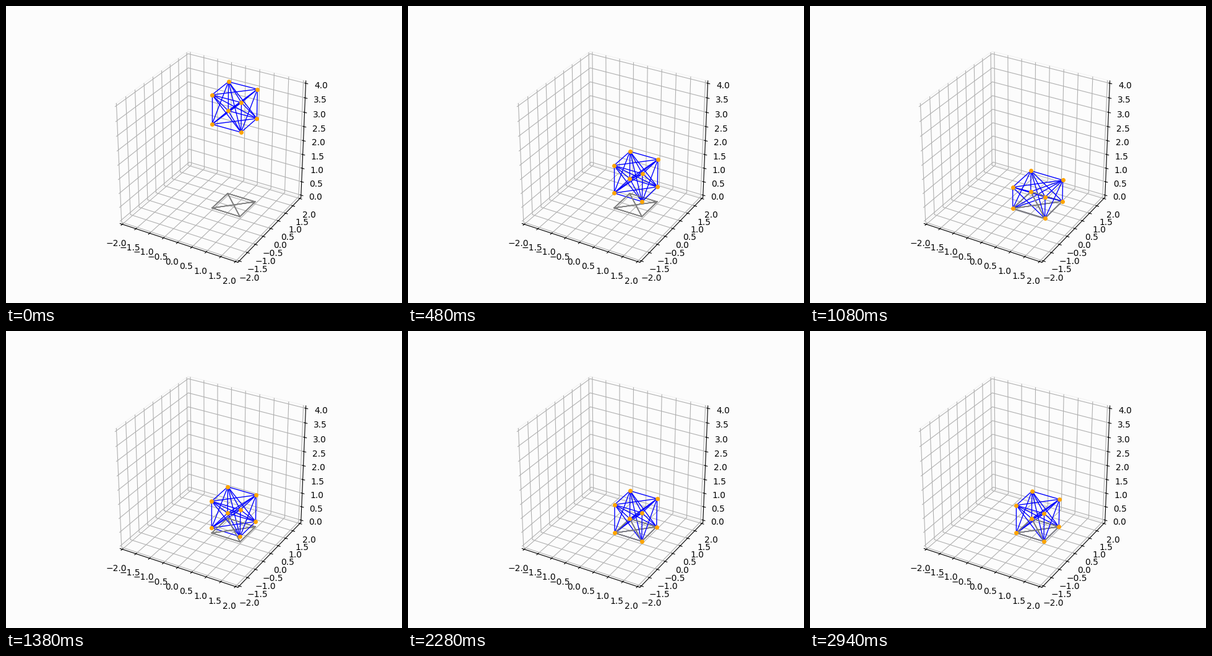
Recreate the animation shown at these times as a matplotlib script. Size 640 px wide and 480 px high, loop 3000 ms.

```python
from itertools import combinations, cycle, product
from math import cos, exp, pi, sin, tanh

import matplotlib.pyplot as plt
import numpy as np
from matplotlib.animation import FuncAnimation

FRAMES, INTERVAL = 50, 60
PAPER = "#fcfcfc"

# Physics in seconds and cube edges
DT, STEPS = 0.001, 100
GRAVITY, DRAG = 9.81, 0.999
CONTACT = 0.17           # time spent squashed on the floor
RETURN = (0.617, 0.92)   # speed kept; every second bounce regains spring energy
REST_SPEED = 0.45

CORNERS = np.array(list(product((0, 1), repeat=3)), float)
SPRINGS = list(combinations(range(8), 2))


def ringing(t):
    return -0.27 * exp(-0.4 * t) * cos(5.95 * (t - 3.13))


def squash(speed, since):
    return -0.25 * tanh(speed / 2) * sin(pi * since / CONTACT)


def simulate():
    """Return (base height, stretch) of the cube for every frame."""
    lift, v, keep = 3.0, 0.0, cycle(RETURN)
    landed, bounced, resting = None, False, False
    poses = []
    for step in range(FRAMES * STEPS):
        t = step * DT
        if landed is not None and t - landed >= CONTACT:
            v, landed, bounced = -v * next(keep), None, True
            resting = v < REST_SPEED
        if step % STEPS == 0:
            if landed is not None:
                poses.append((0, squash(-v, t - landed)))
            else:
                q = ringing(t) if bounced else 0
                poses.append((max(0, lift - q / 2), q))
        if landed is None and not resting:
            v = (v - GRAVITY * DT) * DRAG
            lift += v * DT
            if lift < 0:
                lift, landed = 0, t + DT
    return poses


def cube(base, stretch):
    width, height = 1 - 0.7 * stretch, 1 + stretch
    pts = (CORNERS - 0.5) * (width, width, height)
    return pts + (0.5, 0.5, base + height / 2)


POSES = simulate()

fig = plt.figure(figsize=(6.4, 4.8), dpi=100, facecolor=PAPER)
ax = fig.add_subplot(projection="3d", facecolor=PAPER)
ax.set_box_aspect((1, 1, 1))

links = []
for _ in SPRINGS:
    spring, = ax.plot([], [], [], color="blue", lw=1)
    shadow, = ax.plot([], [], [], color="gray", lw=1)
    links.append((spring, shadow))
masses, = ax.plot([], [], [], "o", color="orange", ms=4)

pad = 4 / 48
ax.set(xlim=(-2 - pad, 2 + pad), ylim=(-2 - pad, 2 + pad), zlim=(-pad, 4 + pad))
for axis in (ax.xaxis, ax.yaxis, ax.zaxis):
    axis.pane.set_fill(False)
    axis.pane.set_edgecolor("#ececec")


def update(n):
    pts = cube(*POSES[n])
    for (i, j), (spring, shadow) in zip(SPRINGS, links):
        x, y, z = pts[[i, j]].T
        spring.set_data_3d(x, y, z)
        shadow.set_data_3d(x, y, 0 * z)
    masses.set_data_3d(*pts.T)
    return [masses]


anim = FuncAnimation(fig, update, frames=FRAMES, interval=INTERVAL,
                     repeat=True, repeat_delay=0, cache_frame_data=False)
plt.show()
```
